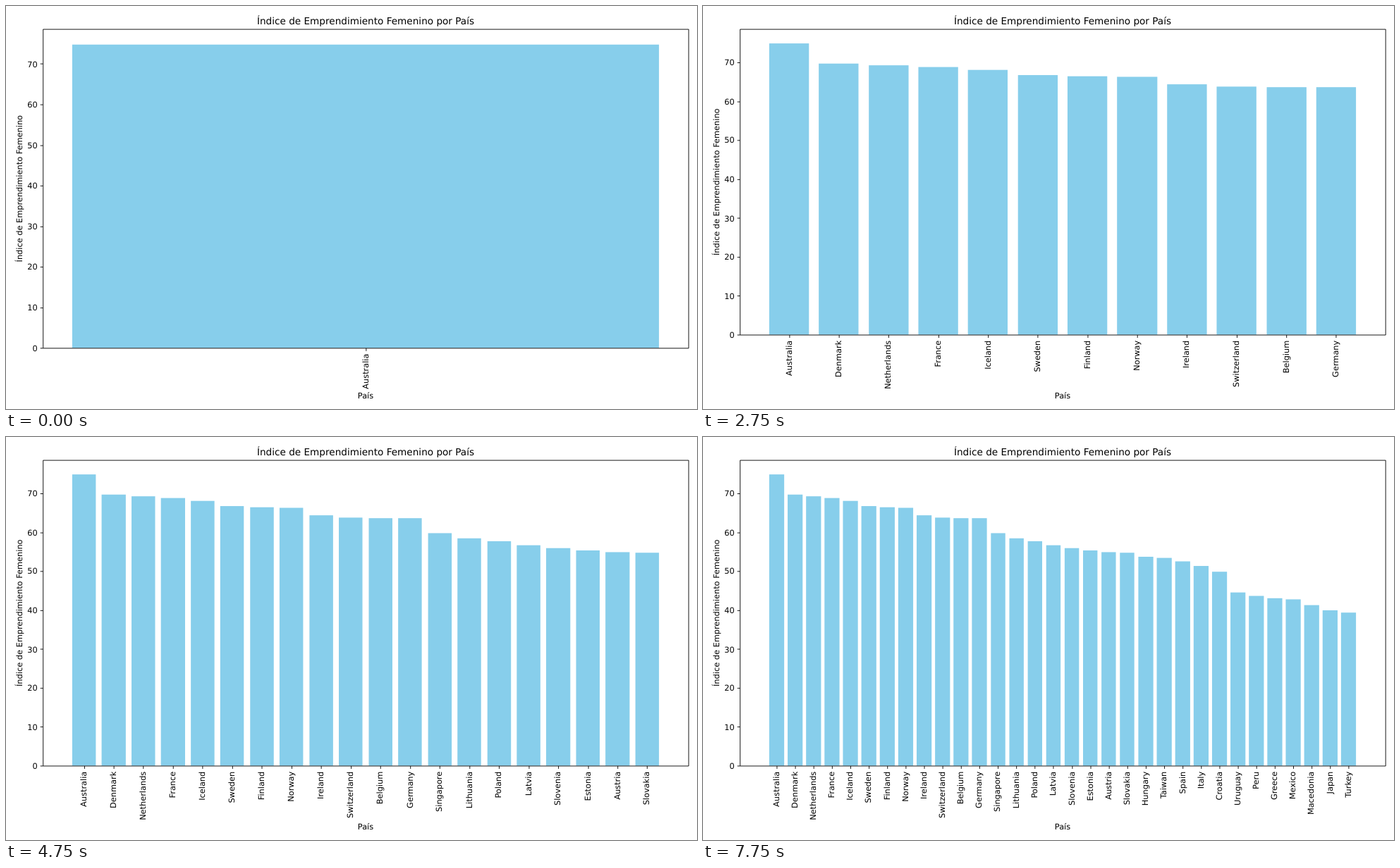
Write an HTML page that moves like this. It is 980x572 px and loops after 8 s.

```html
<!DOCTYPE html>
<html lang="es">
<head>
<meta charset="utf-8">
<title>Índice de Emprendimiento Femenino</title>
<style>
  html, body { margin: 0; width: 100%; height: 100%; overflow: hidden; background: #fff; }
  svg { display: block; }
  text { font: 13.889px "DejaVu Sans", sans-serif; text-rendering: geometricPrecision; text-anchor: middle; }
  .title { font-size: 16.667px; }
  .end { text-anchor: end; }
  .bar { fill: #87ceeb; }
  .line { fill: none; stroke: #000; stroke-width: 1.11; }
</style>
</head>
<body>
<svg id="chart" width="980" height="572" viewBox="0 0 1200 700" preserveAspectRatio="none"></svg>
<script>
const LOOP = 8000, STEP = 250;
// The chart is laid out on a 1200 x 700 figure that is scaled to the stage.
const LEFT = 64, RIGHT = 1185, TOP = 40.2, LABELS_END = 665.4;
const MID = (LEFT + RIGHT) / 2;
const TICK = 4.86, GAP = 9.72, FONT = 13.889;
const MARGIN = 0.05, BAR = 0.8;
const BARS_WIDTH = (RIGHT - LEFT) / (1 + 2 * MARGIN);
const BARS_LEFT = LEFT + BARS_WIDTH * MARGIN;
const LABEL = 'Índice de Emprendimiento Femenino';

const data = Object.entries({
  Australia: 74.8, Denmark: 69.7, Netherlands: 69.3, France: 68.8,
  Iceland: 68, Sweden: 66.7, Finland: 66.4, Norway: 66.3,
  Ireland: 64.3, Switzerland: 63.7, Belgium: 63.6, Germany: 63.6,
  Singapore: 59.8, Lithuania: 58.5, Poland: 57.7, Latvia: 56.6,
  Slovenia: 55.9, Estonia: 55.4, Austria: 54.9, Slovakia: 54.8,
  Hungary: 53.7, Taiwan: 53.4, Spain: 52.5, Italy: 51.4,
  Croatia: 49.9, Uruguay: 44.5, Peru: 43.6, Greece: 43,
  Mexico: 42.8, Macedonia: 41.3, Japan: 40, Turkey: 39.3
});
const yMax = data[0][1] * (1 + MARGIN);
const chart = document.getElementById('chart');
const ruler = document.createElement('canvas').getContext('2d');
ruler.font = '100px "DejaVu Sans", sans-serif';

const snap = v => Math.round(v) + 0.5;
const widthOf = str => ruler.measureText(str).width * FONT / 100;
const text = (x, y, str, cls = '') => `<text class="${cls}" x="${x}" y="${y}">${str}</text>`;
const upright = (x, y, str, cls = '') =>
  `<text class="${cls}" transform="translate(${x} ${y}) rotate(-90)">${str}</text>`;
const line = d => `<path class="line" d="${d}"/>`;

function draw(n) {
  const rows = data.slice(0, n);
  // The longest tick label sets how much room the axis leaves below.
  const bottom = LABELS_END - GAP - Math.max(...rows.map(([name]) => widthOf(name)));
  const yOf = v => bottom - v * (bottom - TOP) / yMax;
  const unit = BARS_WIDTH / (n - 1 + BAR);
  const base = Math.round(bottom);
  let bars = '', axes = '';

  rows.forEach(([name, value], i) => {
    const x = BARS_LEFT + i * unit, mid = x + BAR * unit / 2;
    const x0 = Math.round(x), x1 = Math.round(x + BAR * unit), y = Math.round(yOf(value));
    bars += `<rect class="bar" x="${x0}" y="${y}" width="${x1 - x0}" height="${base - y}"/>`;
    axes += line(`M${snap(mid)} ${base + 0.5}v${TICK}`);
    axes += upright(Math.round(mid + 4), Math.round(bottom + GAP), name, 'end');
  });

  for (let v = 0; v <= 70; v += 10) {
    const y = yOf(v);
    axes += line(`M${LEFT + 0.5} ${snap(y)}h${-TICK}`);
    axes += text(LEFT - GAP + 0.4, Math.round(y + 5.3), v, 'end');
  }

  axes += line(`M${snap(LEFT)} ${snap(TOP)}H${snap(RIGHT)}V${snap(bottom)}H${snap(LEFT)}Z`);
  axes += text(MID, 32, LABEL + ' por País', 'title');
  axes += text(MID, 682, 'País');
  axes += upright(28, (TOP + bottom) / 2, LABEL);
  chart.innerHTML = bars + axes;
}

let shown = 0;
const start = performance.now();
function tick() {
  const n = 1 + Math.floor((performance.now() - start) % LOOP / STEP);
  if (n !== shown) draw(shown = n);
  requestAnimationFrame(tick);
}
tick();
</script>
</body>
</html>
```
